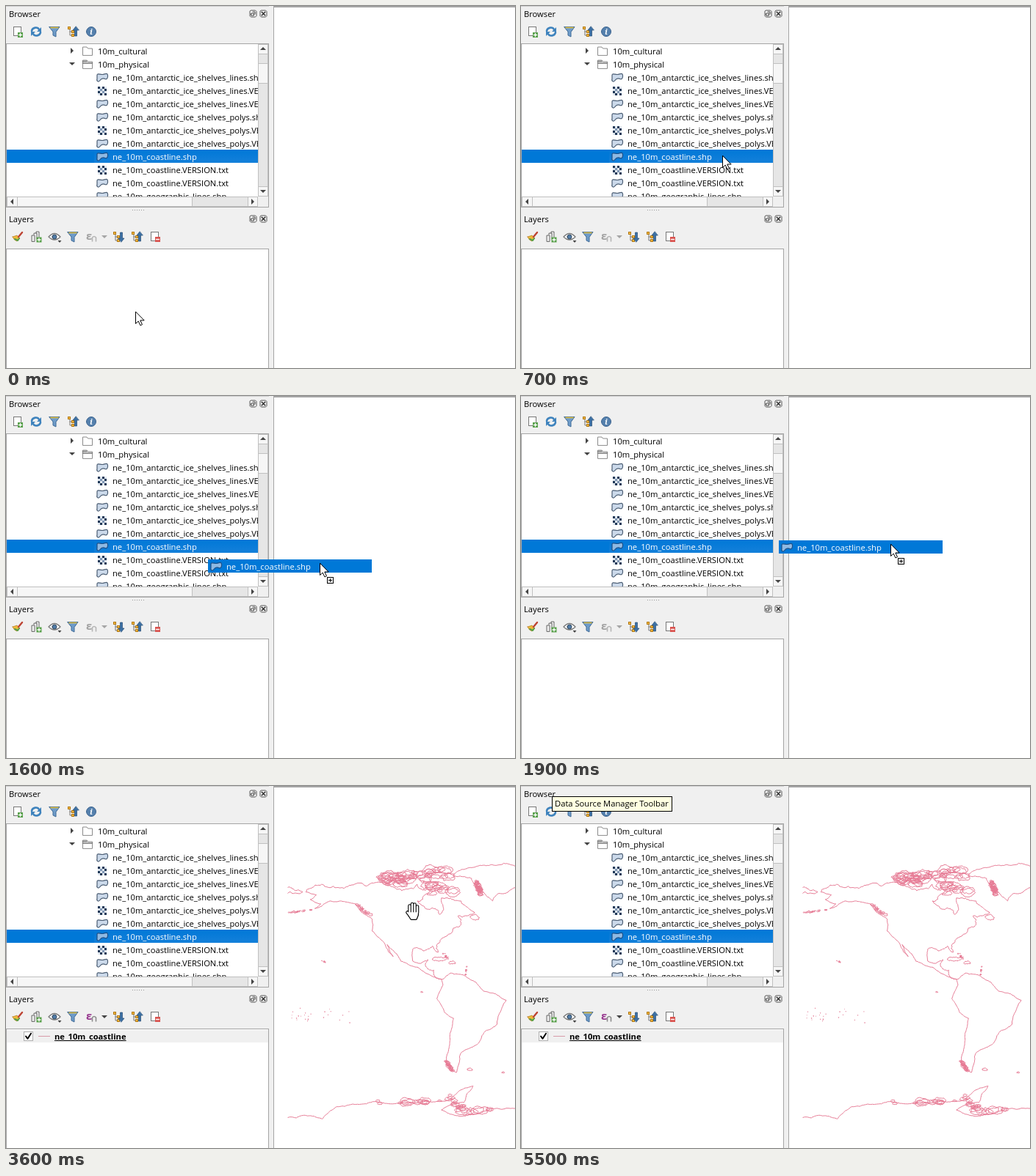
Recreate the animation shown at these times as an HTML page with a canvas. Size 693 by 494 pixels, loop 5600 ms.

```html
<!DOCTYPE html>
<html lang="en">
<head>
<meta charset="utf-8">
<title>Adding a layer by drag and drop</title>
<style>
html, body { margin: 0; width: 100%; height: 100%; overflow: hidden; background: #f0f0f0; }
canvas { display: block; }
</style>
</head>
<body>
<canvas id="stage" width="693" height="494"></canvas>
<script>
const c = document.getElementById('stage').getContext('2d');
const FONT = '11.2px "Open Sans", "Noto Sans", sans-serif';
const LOOP = 5600, BLUE = '#0078d7', PINK = '#e77b95', EDGE = '#a5a5a5';

// ---- drawing helpers ----
function rect(x, y, w, h, fill, edge) {
  c.fillStyle = edge || fill;
  c.fillRect(x, y, w, h);
  if (edge) {
    c.fillStyle = fill;
    c.fillRect(x + 1, y + 1, w - 2, h - 2);
  }
}
function text(s, x, y, color = '#000', font = FONT) {
  c.font = font;
  c.fillStyle = color;
  c.fillText(s, x, y);
}
function shape(x, y, d, fill, stroke, width = 1, turn = 0) {
  const p = new Path2D(d);
  c.save();
  c.translate(x, y);
  c.rotate(turn * Math.PI / 2);
  c.lineWidth = width;
  c.lineCap = c.lineJoin = 'round';
  if (fill) { c.fillStyle = fill; c.fill(p); }
  if (stroke) { c.strokeStyle = stroke; c.stroke(p); }
  c.restore();
}
// Small triangle: turn 0 points down, then left, up, right.
const triangle = (x, y, turn, color = '#444') => shape(x, y, 'M-4-2H4L0 2Z', color, null, 1, turn);

// ---- map: a few key points, roughened by seeded noise ----
let seed = 7;
const rnd = () => (seed = seed * 16807 % 2147483647) / 2147483647;
const map = new Path2D();
const project = (lon, lat) => [383.5 + 2.052 * (lon + 180), 280 - 2.052 * lat];

function rough(x0, y0, x1, y1, k) {
  const dx = x1 - x0, dy = y1 - y0;
  if (Math.hypot(dx, dy) < 2.5) return map.lineTo(x1, y1);
  const r = (rnd() - .5) * k;
  const mx = (x0 + x1) / 2 - dy * r, my = (y0 + y1) / 2 + dx * r;
  rough(x0, y0, mx, my, k);
  rough(mx, my, x1, y1, k);
}
function coast(k, ...p) {
  let [x, y] = project(p[0], p[1]);
  map.moveTo(x, y);
  for (let i = 2; i < p.length; i += 2) {
    const [u, v] = project(p[i], p[i + 1]);
    rough(x, y, u, v, k);
    [x, y] = [u, v];
  }
}
function island(lon, lat, rx, ry = rx * .5) {
  const p = [];
  for (let a = 0; a < 9; a++) {
    const q = .55 + rnd() * .45;
    p.push(lon + rx * q * Math.cos(a * .7), lat + ry * q * Math.sin(a * .7));
  }
  coast(.4, ...p, p[0], p[1]);
}
// Scatters n islands along a line, within `spread` degrees of latitude.
function chain(n, size, spread, lon0, lat0, lon1, lat1) {
  for (let i = 0; i < n; i++) {
    const f = rnd();
    island(lon0 + (lon1 - lon0) * f, lat0 + (lat1 - lat0) * f + (rnd() * 2 - 1) * spread, size * (.4 + rnd()));
  }
}

// Arctic coast and Hudson Bay, Atlantic, South America, Pacific
coast(.4, -168,66, -166,68, -157,71, -128,70, -108,68, -94,71, -82,67, -94,60, -82,55, -79,51,
  -77,57, -78,62, -70,61, -65,60, -56,52);
coast(.4, -56,52, -67,50, -65,45, -70,42, -76,36, -81,31, -80,26, -84,30, -97,28, -97,20, -91,19,
  -87,21, -88,16, -83,14, -82,9, -77,8);
coast(.18, -77,8, -72,12, -62,10, -50,0, -35,-6, -39,-14, -41,-22, -48,-26, -53,-34, -57,-37,
  -65,-41, -66,-47, -68,-54);
coast(.12, -68,-54, -75,-50, -73,-38, -70,-18, -76,-14, -81,-5, -77,4, -78,8);
coast(.18, -78,8, -86,11, -94,16, -105,20, -114,31, -110,23, -115,30, -124,40, -124,48, -135,58,
  -145,60, -152,60, -162,55, -158,58, -165,61, -161,64, -168,66);
// Eastern Siberia, Greenland, Antarctica
coast(.4, -180,69, -170,66, -178,66, -180,65);
coast(.25, -29,83, -60,82, -70,77, -58,75, -53,67, -44,60, -40,65, -29,69);
coast(.18, -180,-84, -157,-85, -148,-77, -125,-74, -75,-73, -67,-67, -57,-63, -63,-74, -78,-79,
  -62,-83, -45,-78, -29,-78);

chain(46, 5, 3.5, -118, 73, -72, 79);   // Arctic archipelago
chain(12, 5, 2, -90, 72, -66, 65);
chain(30, 2, 2, -55, 73, -52, 66);      // western Greenland
chain(22, 1.5, 1, -75, -46, -70, -54);  // Chilean fjords
chain(14, 1.5, 1, -134, 57, -125, 50);  // British Columbia
chain(14, .8, .5, -180, 52, -164, 54);  // Aleutians
chain(5, .7, .3, -160, 22, -155, 19);   // Hawaii
chain(26, .25, 5, -178, -15, -138, -17); // Polynesia
chain(8, .5, .5, -61, 18, -62, 11);     // Antilles
chain(9, .7, 1, -78, 26, -73, 22);
chain(12, 4, 1, -125, -74, -70, -73);   // Antarctic shelves
chain(14, 3, 2, -75, -69, -62, -79);
chain(8, 5, 1, -70, -80, -38, -79);
island(-79, 21.5, 6, 1.5);
island(-71, 19, 3, 1.3);
island(-56, 49, 4, 2.5);
island(-84, 65, 4, 2);
island(-59, -52, 2);
island(-37, -54, 1.2);
island(-91, -.5, 1);

// ---- icons ----
function vectorIcon(x, y, selected) {
  shape(x, y, 'M-7-3C-7-6-3-4 0-4S7-7 7.5-3 6 3 4 2-1 1-3 4-8 5-7 2Z',
    selected ? '#8fb9e2' : '#cbd9ea', selected ? '#1d4f86' : '#4b5d73', 1.2);
}
function rasterIcon(x, y) {
  for (let i = 0; i < 16; i++) {
    const col = i % 4, row = i >> 2;
    const tone = (col + row) % 2 ? '#dfe6ee' : (col * row) % 3 ? '#7f96b4' : '#1f3857';
    rect(x - 6 + col * 3, y - 6 + row * 3, 3, 3, tone);
  }
}
function folderIcon(x, y, open) {
  shape(x, y, 'M-6.5 5.5V-5.5H-1L.5-3.5H6.5V5.5Z', '#fff', '#8a8a8a');
  if (open) shape(x, y, 'M-6.5-1.5H6.5M-6.5-4H-1', null, '#777', 1.6);
}
function funnel(x, y) {
  shape(x, y, 'M-7-6.5H7L2 .5V7L-2 5V.5Z', '#6f9cc9', '#3f6a96');
  shape(x, y, 'M-5-5.5H5', null, '#e9c23c', 1.6);
}
function treeIcon(x, y, up) {
  shape(x, y, 'M-4-6V5H0M-4 0H0', null, '#777');
  for (let i = 0; i < 3; i++) rect(x - (i ? 2 : 7), y - 7 + i * 5, 4, 4, '#f4b942', '#b27a16');
  shape(x + 4, y, 'M0 7L4 2H1.5V-6H-1.5V2H-4Z', '#3c70a4', '#274e78', .7, up ? 2 : 0);
}
function refresh(x, y) {
  for (const turn of [0, 2]) {
    shape(x, y, 'M-6-1C-5-6 2-7 4-3', null, '#3f83bd', 2.6, turn);
    shape(x, y, 'M7-6V0H1Z', '#3f83bd', null, 1, turn);
  }
}
function pageIcon(x, y, plus, bx, by) {
  rect(x, y, 11, 13, '#fff', '#777');
  badge(bx, by, plus);
}
function badge(x, y, plus) {
  rect(x - 3.5, y - 3.5, 7, 7, plus ? '#58a04b' : '#d9534f');
  shape(x, y, plus ? 'M-2 0H2M0-2V2' : 'M-2 0H2', null, '#fff', 1.3);
}
function panelHead(title, y) {
  text(title, 4, y + 5);
  for (const x of [336.5, 350.5])
    shape(x, y + .5, 'M-3-4.5H3L4.5-3V3L3 4.5H-3L-4.5 3V-3Z', '#f4f4f4', '#555');
  shape(336.5, y + .5, 'M-2.5-.5H1V2.5H-2.5ZM-.5-2.5H2.5V.5', null, '#444');
  shape(350.5, y + .5, 'M-2.3-2.3L2.3 2.3M2.3-2.3L-2.3 2.3', null, '#333', 1.6);
}

// ---- panels ----
const shore = 'ne_10m_coastline', files = [];
for (const group of ['antarctic_ice_shelves_lines', 'antarctic_ice_shelves_polys', 'coastline', 'geographic_lines'])
  for (const end of ['shp', 'VERSION.txt', 'VERSION.txt']) files.push(`ne_10m_${group}.${end}`);

function browser() {
  panelHead('Browser', 10);
  pageIcon(10, 28, true, 19.5, 39.5);
  refresh(41, 35);
  funnel(66, 35);
  treeIcon(91, 35, true);
  shape(116, 35, 'M-6.5 0A6.5 6.5 0 1 1 6.5 0A6.5 6.5 0 1 1-6.5 0Z', '#5580ad', '#3d6590');
  text('i', 114, 39, '#fff', 'italic bold 11px "Noto Serif", serif');

  rect(0, 51, 358, 224, '#fff', EDGE);
  c.save();
  c.beginPath();
  c.rect(1, 52, 342, 208);
  c.clip();
  triangle(90, 61, 3);
  triangle(90, 79, 0);
  ['10m_cultural', '10m_physical'].forEach((s, i) => {
    folderIcon(111, 61.5 + 18 * i, i);
    text(s, 125, 66 + 18 * i);
  });
  files.forEach((s, i) => {
    const y = 97 + 18 * i, on = i === 6;
    if (on) {
      const glow = c.createLinearGradient(0, y - 9, 0, y + 9);
      glow.addColorStop(0, BLUE);
      glow.addColorStop(1, '#1480da');
      rect(1, y + 1 - 10, 342, 18, BLUE);
      rect(120, y + 1 - 10, 223, 18, glow);
    }
    if (i % 3 === 1) rasterIcon(131, y + 1);
    else vectorIcon(131, y + .5, on);
    text(s, 145, y + 5, on ? '#fff' : '#000');
  });
  c.restore();

  // scroll bars
  const part = (x, y, w, h, fill = '#f6f6f6') => rect(x, y, w, h, fill, '#c0c0c0');
  part(343, 52, 14, 208, '#e6e6e6');
  part(343, 52, 14, 14);
  part(343, 78, 14, 28);
  part(343, 246, 14, 14);
  part(1, 260, 342, 14, '#e6e6e6');
  part(1, 260, 15, 14);
  part(15, 260, 239, 14);
  part(329, 260, 14, 14);
  rect(343, 260, 14, 14, '#f0f0f0');
  triangle(350, 58, 2);
  triangle(350, 253, 0);
  triangle(8, 267, 1);
  triangle(336, 267, 3);
  for (let x = 172; x < 188; x += 3) rect(x, 278, 1, 1, '#999');
}

function layers(loaded) {
  panelHead('Layers', 290);
  shape(16, 315, 'M-7 0L-1-2L3 2L-1 6Q-5 5-7 0Z', '#eeb93c', '#b47a1e', .7);
  shape(16, 315, 'M-4 3L0 5L2 2', null, '#58a04b', 2);
  shape(16, 315, 'M1 0L6-6', null, '#bd4434', 2.4);
  shape(41, 315, 'M-6 6V-2H-2V6ZM-3-3V-5H1V3M0-5V-7H4V1', '#eee', '#666');
  badge(45, 319, true);
  shape(66, 315, 'M-8 0Q0-9 8 0Q0 8-8 0Z', '#fff', '#777', 1.3);
  shape(66, 315, 'M-3 0A3 3 0 1 1 3 0A3 3 0 1 1-3 0Z', '#4f7ba8', '#384c60');
  shape(73, 321, 'M-2.5-1H2.5L0 2Z', '#444');
  funnel(91, 315);
  text('ε', 109, 319, loaded ? '#96358d' : '#a0a0a0', 'bold 15px "Noto Sans", sans-serif');
  shape(120, 318, 'M-2.5 3V-2Q0-5 2.5-2V3', null, loaded ? '#8c8c8c' : '#b5b5b5', 1.6);
  triangle(134, 315, 0, loaded ? '#444' : '#a5a5a5');
  treeIcon(153, 315, false);
  treeIcon(178, 315, true);
  pageIcon(197, 308, false, 206.5, 318.5);

  rect(0, 331, 358, 164, '#fff', EDGE);
  if (!loaded) return;
  rect(1, 333, 356, 17, '#f0f0f0');
  rect(24, 335, 13, 13, '#fff', '#b0b0b0');
  shape(30.5, 341.5, 'M-3.5 0L-1 3.3L3.5-3.8', null, '#000', 2);
  rect(44, 341, 16, 1, '#d79aa8');
  text(shore, 66, 346, '#000', 'bold ' + FONT);
  rect(66, 347, c.measureText(shore).width, 1, '#000');
}

function canvasPane(loaded) {
  rect(364, 0, 329, 494, EDGE);
  rect(365, 2, 328, 492, '#fff');
  if (!loaded) return;
  c.strokeStyle = PINK;
  c.lineWidth = 1;
  c.stroke(map);
}

function tooltip(s, x, y) {
  c.font = FONT;
  rect(x, y, Math.round(c.measureText(s).width) + 9, 21, '#ffffe1', '#000');
  text(s, x + 4, y + 14);
}

// ---- pointer ----
const track = [[0, 176, 417], [300, 274, 245], [400, 280, 233], [600, 276, 207], [800, 272, 201],
  [1200, 272, 201], [1600, 427, 228], [1700, 475, 219], [2300, 560, 168], [3500, 560, 168],
  [3600, 554, 171], [4000, 225, 347], [4600, 37, 38], [4700, 40, 8]];

function pointerAt(t) {
  const i = Math.max(1, track.findIndex(k => k[0] >= t));
  const [t0, x0, y0] = track[i - 1], [t1, x1, y1] = track[i];
  const f = (t - t0) / (t1 - t0);
  return [Math.round(x0 + (x1 - x0) * f), Math.round(y0 + (y1 - y0) * f)];
}
function arrow(x, y) {
  shape(x + .5, y + .5, 'M0 0V16L3.7 12.6L6.4 18.4L9 17.2L6.3 11.5H11.3Z', '#fff', '#000');
}
function hand(x, y) {
  const fingers = 'M-4.5 3V-7.5M-1 1V-10M2.5 1V-9.5M6 2V-6.5M-7.5 1.5L-3 7';
  const palm = 'M-4.5 2H6V5L4 10H-2L-5 5Z';
  shape(x, y, fingers, null, '#000', 4.6);
  shape(x, y, palm, '#000', '#000', 4);
  shape(x, y, fingers, null, '#fff', 2.4);
  shape(x, y, palm, '#fff', '#fff', 1.6);
}
function drag(x, y) {
  rect(x - 152, y - 5, 223, 18, BLUE);
  vectorIcon(x - 141, y + 4.5, true);
  text(shore + '.shp', x - 127, y + 9, '#fff');
  arrow(x, y);
  rect(x + 10, y + 19, 9, 9, '#fff', '#000');
  shape(x + 14.5, y + 23.5, 'M-2 0H2M0-2V2', null, '#000');
}
function pointer(t) {
  if (t === 1200 || t >= 4800) return;
  const [x, y] = pointerAt(t);
  const draw = t > 1200 && t < 3100 ? drag : x > 364 ? hand : arrow;
  draw(x, y);
}

function frame() {
  const t = Math.floor(performance.now() % LOOP / 100) * 100;
  const loaded = t >= 3500;
  const path = 'Z:/-vagrant/downloads/Natural_Earth_quick_start/10m_physical/' + shore;
  rect(0, 0, 693, 494, '#f0f0f0');
  rect(0, 0, 358, 1, '#d0d0d0');
  canvasPane(loaded);
  browser();
  layers(loaded);
  if (t >= 400 && t < 700) tooltip(path + '.VERSION.txt', 276, 265);
  if (t >= 800 && t < 1200) tooltip(path + '.shp', 274, 222);
  if (t >= 5500) tooltip('Data Source Manager Toolbar', 42, 14);
  pointer(t);
  requestAnimationFrame(frame);
}
frame();
</script>
</body>
</html>
```
